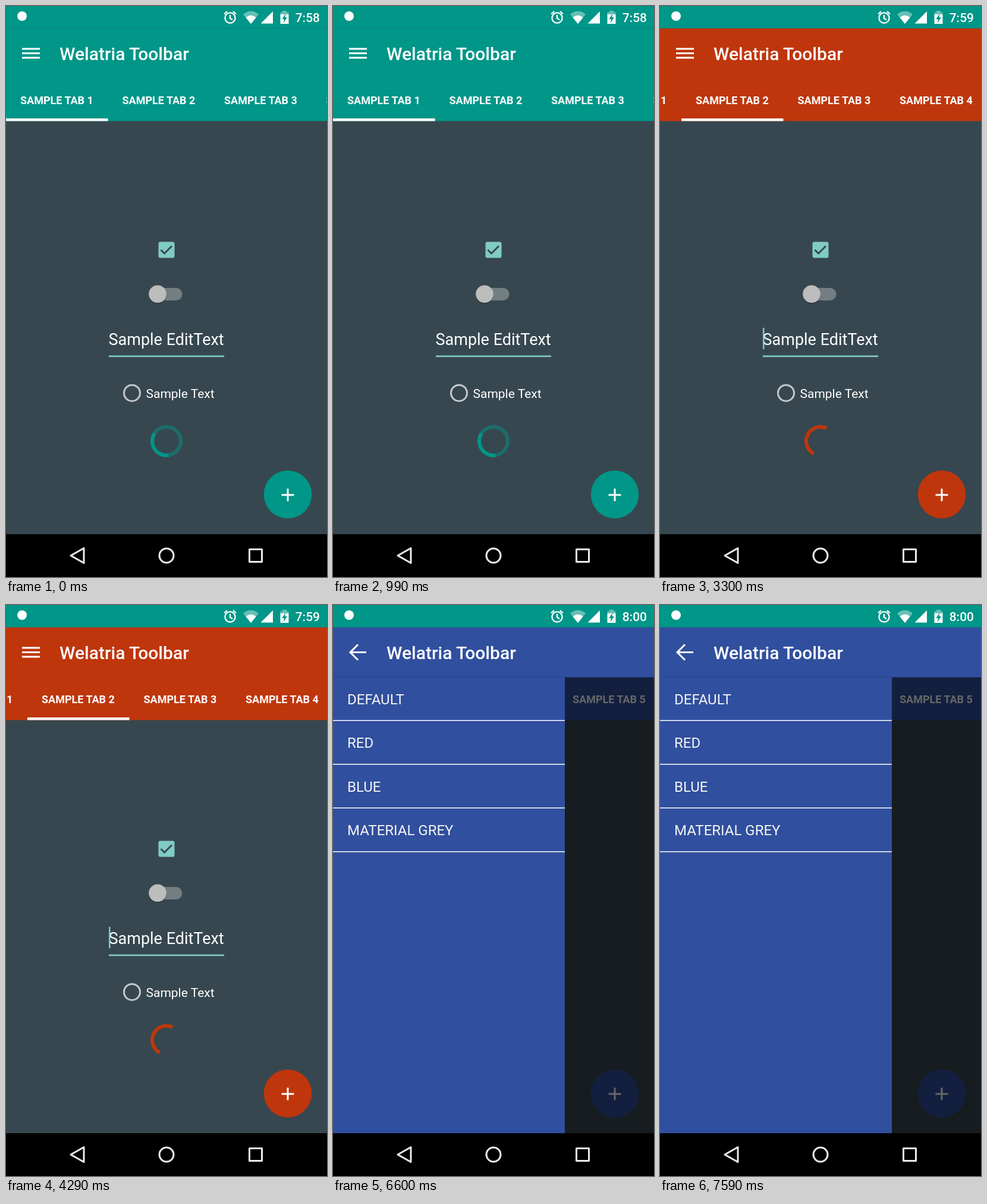
Write an HTML page that moves like this. It is 540x960 px and loops after 8250 ms.

```html
<!DOCTYPE html>
<html lang="en">
<head>
<meta charset="utf-8">
<title>Toolbar themes</title>
<style>
  html, body { margin: 0; width: 100%; height: 100%; overflow: hidden; background: #000; }
  svg { display: block; width: 540px; height: 960px; font-family: Roboto, sans-serif; fill: #fff; }
  .line { fill: none; stroke: #fff; stroke-width: 3; }
  .theme { fill: var(--theme); }
  #tabs text { font-size: 18px; font-weight: 700; }
  #drawer text { font-size: 24px; fill: #f4f4f4; }
</style>
</head>
<body>
<svg viewBox="0 0 540 960">
  <rect width="540" height="888" fill="#37474f"/>
  <rect class="theme" y="37.5" width="540" height="156"/>

  <g id="tabs"></g>
  <rect id="marker" y="189" width="171.5" height="4.5"/>

  <!-- form controls -->
  <rect x="256.5" y="396.5" width="27" height="27" rx="3" fill="#80cbc4"/>
  <path class="line" d="M260.5 410l6 6 12.5-12.5" style="stroke:#37474f"/>
  <rect x="245" y="474" width="51.5" height="21" rx="10.5" fill="#737e83"/>
  <circle cx="255" cy="485.7" r="15" fill="#000" opacity=".25"/>
  <circle cx="255" cy="484.3" r="14.8" fill="#bdbdbd"/>
  <text x="172.5" y="569.5" font-size="27">Sample EditText</text>
  <rect x="173" y="587.5" width="194" height="2.7" fill="#80cbc4"/>
  <rect id="cursor" x="173" y="541" width="2.5" height="36" fill="#80cbc4"/>
  <circle class="line" cx="212" cy="650.7" r="13.5" style="stroke:#c3c8ca"/>
  <text x="235.5" y="658.8" font-size="21">Sample Text</text>

  <g fill="none" stroke-width="6" style="stroke:var(--theme)">
    <circle id="ring" cx="270" cy="731.5" r="24" opacity=".5"/>
    <circle id="arc" cx="270" cy="731.5" r="24" pathLength="360"/>
  </g>
  <circle class="theme" cx="474" cy="821.2" r="40.3"/>
  <path class="line" d="M463.5 822h21M474 811.5v21"/>

  <g id="drawer">
    <rect y="121.5" width="540" height="766.5" fill="#000" opacity=".6"/>
    <rect class="theme" y="121.5" width="390" height="766.5"/>
  </g>

  <!-- toolbar -->
  <path id="burger" class="line" d="M27 72h30M27 79.5h30M27 87h30"/>
  <path id="back" class="line" d="M56 79.5H29.5M42 66.5l-13 13 13 13"/>
  <text x="90" y="91" font-size="30" font-weight="500">Welatria Toolbar</text>

  <!-- status bar -->
  <rect width="540" height="37.5" fill="#009688"/>
  <circle cx="27" cy="17" r="8"/>
  <g class="line" style="stroke-width:2.3">
    <circle cx="377" cy="20" r="8.6"/>
    <path d="M367 13.5l5-4.3M387 13.5l-5-4.3M377 15v5.7l4 2.5"/>
  </g>
  <path d="M412 30L399 14Q412 3.5 425 14Z" opacity=".4"/>
  <path d="M412 30L403.5 19.5Q412 12 420.5 19.5Z"/>
  <path d="M428.5 29.5H449V9Z"/>
  <path d="M461.5 14v-3.5H465V8h7v2.5h3.5V14Z" opacity=".4"/>
  <path d="M461.5 14h14v16h-14Z"/>
  <path d="M470.5 13l-6.3 9h3.6l-1 6.5 6.2-9.5h-3.6Z" fill="#009688"/>
  <text id="clock" x="528" y="27.3" font-size="21" font-weight="500" text-anchor="end"></text>

  <!-- navigation bar -->
  <rect y="888" width="540" height="72" fill="#000"/>
  <g class="line" style="stroke:#ececec" stroke-linejoin="round">
    <path d="M109 924l22-12.5v25Z"/>
    <circle cx="270" cy="924" r="12"/>
    <rect x="409.5" y="913.5" width="21" height="21"/>
  </g>
</svg>
<script>
const HOLD = 1650, TAB = 171.5;
const TEAL = '#009688', RED = '#bf360c', BLUE = '#304f9e';
const $ = id => document.getElementById(id);

// arc: start angle and sweep in degrees, clockwise from the right
const scenes = [
  { clock: '7:58', theme: TEAL, tab: 0, arc: [82, 130], ring: true },
  { clock: '7:59', theme: TEAL, tab: 0, arc: [82, 130], ring: true, open: true },
  { clock: '7:59', theme: RED, tab: 1, arc: [118, 177], cursor: true },
  { clock: '8:00', theme: BLUE, tab: 2, arc: [-11, 41] },
  { clock: '8:00', theme: BLUE, tab: 2, arc: [-11, 41], open: true }
];

$('tabs').innerHTML = [1, 2, 3, 4, 5].map((n, i) =>
  `<text x="${24 + i * TAB}" y="165">SAMPLE TAB ${n}</text>`).join('');

$('drawer').innerHTML += ['DEFAULT', 'RED', 'BLUE', 'MATERIAL GREY'].map((label, i) => {
  const y = 121.5 + i * 73.5;
  return `<text x="24" y="${y + 45}">${label}</text>
    <rect y="${y + 72}" width="390" height="1.5"/>`;
}).join('');

const show = (id, on) => $(id).style.display = on ? '' : 'none';

function draw(scene) {
  const { clock, theme, tab, arc: [start, sweep], ring, cursor, open } = scene;
  const markerX = tab ? 36 : 0;
  document.documentElement.style.setProperty('--theme', theme);
  $('clock').textContent = clock;
  $('tabs').setAttribute('transform', `translate(${markerX - tab * TAB})`);
  $('marker').setAttribute('x', markerX);
  $('arc').setAttribute('stroke-dasharray', `${sweep} ${360 - sweep}`);
  $('arc').setAttribute('transform', `rotate(${start} 270 731.5)`);
  show('ring', ring);
  show('cursor', cursor);
  show('drawer', open);
  show('back', open);
  show('burger', !open);
}

let current;
function tick() {
  const scene = scenes[Math.floor(performance.now() / HOLD) % scenes.length];
  if (scene !== current) draw(current = scene);
  requestAnimationFrame(tick);
}
tick();
</script>
</body>
</html>
```
